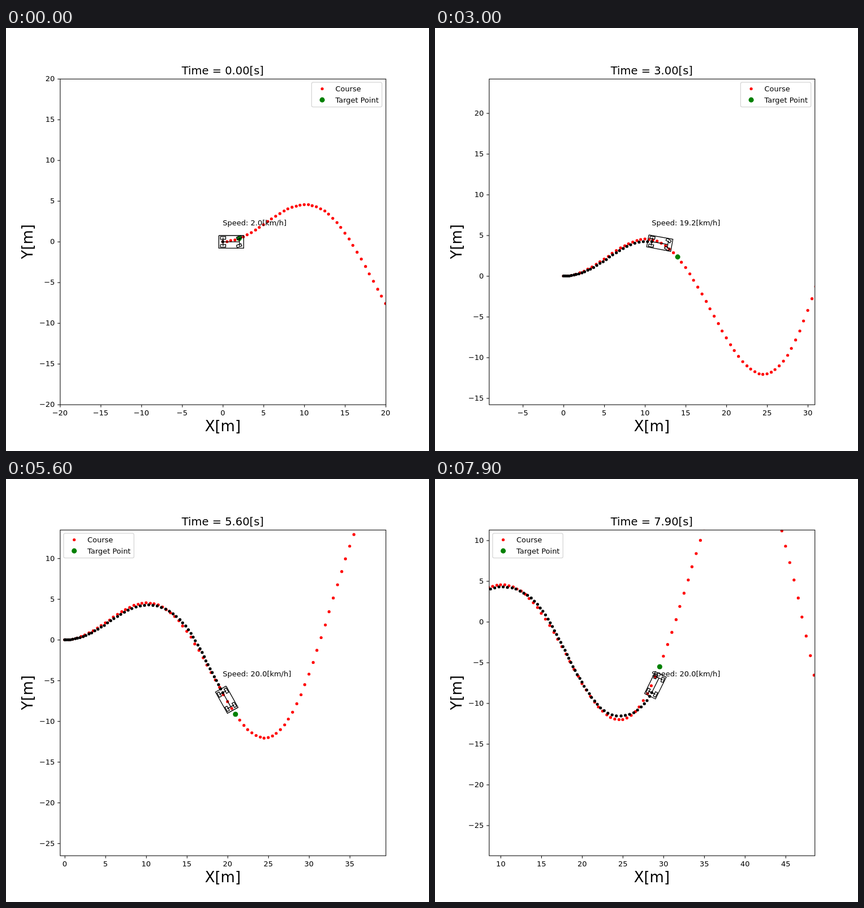
These frames come from a looping animation (748 by 748 pixels, 8000 ms). An HTML page with a canvas:

```html
<!DOCTYPE html>
<html lang="en">
<head>
<meta charset="utf-8">
<title>Path tracking</title>
<style>
  html, body { margin: 0; width: 100%; height: 100%; overflow: hidden; background: #fff; }
  canvas { display: block; }
</style>
</head>
<body>
<canvas id="view" width="748" height="748"></canvas>
<script>
const ctx = document.getElementById('view').getContext('2d');
const STEPS = 80, DT = 0.1;
const WHEEL_BASE = 2, TARGET_SPEED = 20 / 3.6;
const MIN_LOOK = 2, LOOK_GAIN = 0.3;

// The figure is laid out on an 800 unit square
const FIT = 748 / 800;
const BOX = { left: 102, top: 96, right: 718, bottom: 712 };
const MID = { x: 410, y: 404 };
const PX = 15.4, RANGE = 20;
const SMALL = 13.89, DOT = 2.78, BIG_DOT = 4.86;

const courseY = x => Math.sin(x / 5) * x / 2;
const course = Array.from({ length: 100 }, (_, i) => ({ x: i / 2, y: courseY(i / 2) }));
const gap = (p, q) => Math.hypot(p.x - q.x, p.y - q.y);

// Pure pursuit steering with proportional speed control
function simulate() {
  const states = [];
  let x = 0, y = 0, yaw = 0, speed = 0;
  for (let n = 0; n < STEPS; n++) {
    const here = { x, y };
    const look = LOOK_GAIN * speed + MIN_LOOK;
    let i = 0;
    course.forEach((p, k) => { if (gap(p, here) < gap(course[i], here)) i = k; });
    while (i < course.length - 1 && gap(course[i], here) < look) i++;
    const target = course[i];
    const alpha = Math.atan2(target.y - y, target.x - x) - yaw;
    const steer = Math.atan(2 * WHEEL_BASE * Math.sin(alpha) / look);
    x += speed * Math.cos(yaw) * DT;
    y += speed * Math.sin(yaw) * DT;
    yaw += speed / WHEEL_BASE * Math.tan(steer) * DT;
    speed += (TARGET_SPEED - speed) * DT;
    states.push({ x, y, yaw, speed, steer, target });
  }
  return states;
}
const states = simulate();

const crisp = v => Math.floor(v + 0.5) + 0.5;

function text(str, x, y, size = SMALL, align = 'left') {
  ctx.font = `${size}px "DejaVu Sans", Verdana, sans-serif`;
  ctx.textAlign = align;
  ctx.fillStyle = '#000';
  ctx.fillText(str, x, y);
}

function dot(x, y, r, color) {
  ctx.fillStyle = color;
  ctx.beginPath();
  ctx.arc(Math.round(x), Math.round(y), r, 0, 2 * Math.PI);
  ctx.fill();
}

function line(points, width) {
  ctx.lineWidth = width;
  ctx.strokeStyle = '#000';
  ctx.beginPath();
  points.forEach(([x, y]) => ctx.lineTo(x, y));
  ctx.stroke();
}

const rect = (x0, x1, h) => [[x0, h], [x1, h], [x1, -h], [x0, -h], [x0, h]];
const turn = (points, a, dx, dy) => points.map(([x, y]) => [
  x * Math.cos(a) - y * Math.sin(a) + dx,
  x * Math.sin(a) + y * Math.cos(a) + dy
]);

function drawCar({ yaw, steer }) {
  const part = (points, angle = 0, dx = 0, dy = 0) => {
    const placed = turn(turn(points, angle, dx, dy), yaw, 0, 0);
    const snap = yaw + angle === 0 ? crisp : v => v;
    line(placed.map(([x, y]) => [snap(MID.x + x * PX), snap(MID.y - y * PX)]), 1.39);
  };
  part(rect(-0.5, WHEEL_BASE + 0.5, 0.75));
  for (const side of [0.5, -0.5]) {
    part(rect(-0.3, 0.3, 0.15), 0, 0, side);
    part(rect(-0.3, 0.3, 0.15), steer, WHEEL_BASE, side);
  }
  part([[0, 0.5], [0, -0.5]]);
  part([[WHEEL_BASE, 0.5], [WHEEL_BASE, -0.5]]);
  part([[0, 0], [WHEEL_BASE, 0]]);
}

function drawAxes({ x, y }) {
  const label = v => (v < 0 ? '\u2212' : '') + Math.abs(v);
  const ticks = (center, draw) => {
    for (let v = Math.ceil((center - RANGE) / 5) * 5; v <= center + RANGE; v += 5) draw(v);
  };
  ticks(x, v => {
    const px = MID.x + (v - x) * PX;
    line([[crisp(px), 712.5], [crisp(px), 717.5]], 1.11);
    text(label(v), px, 733, SMALL, 'center');
  });
  ticks(y, v => {
    const py = MID.y - (v - y) * PX;
    line([[102.5, crisp(py)], [97.5, crisp(py)]], 1.11);
    text(label(v), 92.3, Math.round(py + 5), SMALL, 'right');
  });
  ctx.lineWidth = 1.11;
  ctx.strokeRect(BOX.left + 0.5, BOX.top + 0.5, 616, 616);
  text('X[m]', MID.x, 763, 27.78, 'center');
  ctx.save();
  ctx.translate(50, MID.y);
  ctx.rotate(-Math.PI / 2);
  text('Y[m]', 0, 0, 27.78, 'center');
  ctx.restore();
}

// The legend moves to the left corner when the course runs through the right one
function drawLegend({ x, y }) {
  const w = 133, h = 46.5, top = 102.9, right = 578;
  let left = right;
  for (let cx = 0; cx < 49.5; cx += 0.02) {
    const px = MID.x + (cx - x) * PX, py = MID.y - (courseY(cx) - y) * PX;
    if (px > right && px < right + w && py > top && py < top + h) left = 109;
  }
  ctx.globalAlpha = 0.8;
  ctx.beginPath();
  ctx.roundRect(left, top, w, h, 2.78);
  ctx.fillStyle = '#fff';
  ctx.fill();
  ctx.strokeStyle = '#ccc';
  ctx.lineWidth = 1.39;
  ctx.stroke();
  ctx.globalAlpha = 1;
  dot(left + 20, 115, DOT, '#f00');
  dot(left + 20, 136, BIG_DOT, '#008000');
  text('Course', left + 45, 120);
  text('Target Point', left + 45, 141);
}

function draw(n) {
  const car = states[n];
  const plot = (p, r, color) =>
    dot(MID.x + (p.x - car.x) * PX, MID.y - (p.y - car.y) * PX, r, color);
  ctx.setTransform(FIT, 0, 0, FIT, 0, 0);
  ctx.fillStyle = '#fff';
  ctx.fillRect(0, 0, 800, 800);

  ctx.save();
  ctx.beginPath();
  ctx.rect(BOX.left, BOX.top, 616, 616);
  ctx.clip();
  course.forEach(p => plot(p, DOT, '#f00'));
  plot(car.target, BIG_DOT, '#008000');
  states.slice(0, n + 1).forEach(p => plot(p, DOT, '#000'));
  drawCar(car);
  ctx.restore();

  drawAxes(car);
  text(`Speed: ${(car.speed * 3.6).toFixed(1)}[km/h]`, MID.x, 373);
  text(`Time = ${(n * DT).toFixed(2)}[s]`, MID.x, 87.7, 20.83, 'center');
  drawLegend(car);
}

const start = performance.now();
function tick() {
  const time = Math.max(0, performance.now() - start);
  draw(Math.floor(time / 100) % STEPS);
  requestAnimationFrame(tick);
}
tick();
</script>
</body>
</html>
```
